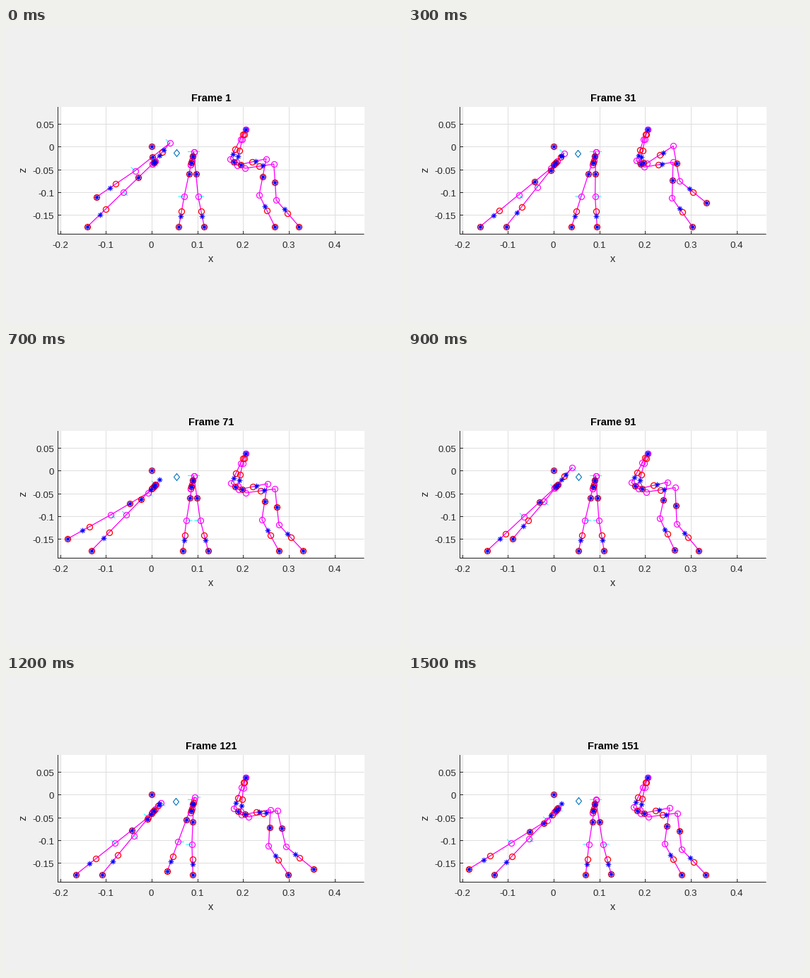
Recreate the animation shown at these times as a matplotlib script. Size 560 px wide and 420 px high, loop 1.6 s.

```python
import matplotlib.pyplot as plt
import numpy as np
from matplotlib.animation import FuncAnimation

W, H, DPI = 560, 420, 100
PX = 72 / DPI          # points per pixel
FRAMES, CYCLE = 16, 16
RATE = 8 / 8.3         # gait phase advanced per drawn frame
SWING = 3.5            # part of the cycle a foot spends in the air

plt.rcParams["font.family"] = "Liberation Sans"


class Leg:
    """A foot that slides on the ground and swings back, pulling its joints.

    Each joint is (rest position, shift per pixel of stride, shift per
    pixel of lift), listed from the body outwards.
    """

    def __init__(self, liftoff, stride, height, joints, stars, axis=None):
        self.liftoff, self.stride, self.height = liftoff, stride, height
        self.rest, self.slide, self.raised = np.swapaxes(joints, 0, 1)
        self.stars = np.array(stars)[:, None]
        self.axis = None if axis is None else np.array(axis)

    def foot(self, phase):
        back, front = self.stride
        t = (phase - self.liftoff) % CYCLE
        if t >= SWING:
            go = (CYCLE - t) / (CYCLE - SWING)
            return back + (front - back) * go, 0
        w = (t / SWING) ** 1.2
        go = w - 1.6 * np.sin(2 * np.pi * w) / (2 * np.pi)
        return back + (front - back) * go, self.height * np.sin(np.pi * w) ** 2

    def points(self, phase):
        x, lift = self.foot(phase)
        reach = x - np.mean(self.stride)
        joints = self.rest + self.slide * reach + self.raised * lift
        return np.vstack([joints, (x, 281.5 - lift)])


STILL = (0, 0)
LEGS = [
    Leg(5.8, (89, 146), 44, [
        ((206.5, 193), STILL, STILL),
        ((210.5, 188.5), STILL, STILL),
        ((210, 190), (0.5, -0.578), (0.4, -0.5)),
        ((167.5, 232), (0.72, -0.3), (0.18, -0.63)),
    ], (0.5, 0.6, 0.5, 0.655), (6, 5)),
    Leg(11, (231, 287), 38, [
        ((260.8, 193.5), STILL, STILL),
        ((262.5, 187.5), STILL, STILL),
        ((265.5, 175.5), STILL, (0.28, -0.75)),
        ((260, 239), (0.55, 0), (0.08, -0.8)),
    ], (0.5, 0.45, 0.5, 0.66), (8.5, 0)),
    Leg(0.5, (378, 431.5), 40, [
        ((339, 143.5), STILL, STILL),
        ((333.5, 158), (0.08, 0.02), STILL),
        ((323.7, 188.5), (0.275, 0.12), STILL),
        ((334.9, 197.8), (0.305, 0.13), (-0.07, -0.24)),
        ((375.7, 191), (0.315, 0.22), (-0.18, -0.82)),
        ((375.4, 242.1), (0.705, 0.22), (-0.1, -0.86)),
    ], (0, 0.75, 0.5, 0.62, 0.5, 0.355)),
]

fig = plt.figure(figsize=(W / DPI, H / DPI), dpi=DPI, facecolor="#f0f0f0")
ax = fig.add_axes([0, 0, 1, 1])
ax.set(xlim=(0, W), ylim=(H, 0))
ax.axis("off")

LEFT, RIGHT, TOP, BOTTOM = 73.5, 506.5, 112, 292.5
INK = "#262626"


def line(xs, ys, color, width=1.0, z=1):
    return ax.plot(xs, ys, color=color, lw=width * PX, zorder=z, snap=False,
                   solid_capstyle="butt")[0]


def marks(marker, color, size, z, width=1.1):
    return ax.plot([], [], ls="", marker=marker, ms=size * PX, mfc="none",
                   mec=color, mew=width * PX, zorder=z)[0]


def label(x, y, text, size=13.3, ha="center", **kw):
    return ax.text(x, y, text, fontsize=size * PX, ha=ha,
                   va=kw.pop("va", "center_baseline"),
                   color=kw.pop("color", INK), **kw)


ax.fill_between([LEFT, RIGHT], TOP, BOTTOM, color="white", lw=0, zorder=0)
for i in range(-2, 5):
    x = round(206 + 64.7 * i) + 0.5
    line([x, x], [TOP, BOTTOM], "#dedede")
    line([x, x], [BOTTOM, BOTTOM - 4.5], INK, z=2)
    label(x - 1, 307, f"{i / 10:g}")
for i in range(-3, 2):
    y = int(168.8 - 32.35 * i) + 0.5
    line([LEFT, RIGHT], [y, y], "#dedede")
    line([LEFT, LEFT + 4.5], [y, y], INK, z=2)
    label(68, y + 0.7, f"{i / 20:g}", ha="right")
line([LEFT, LEFT], [TOP, BOTTOM + 0.5], INK, z=2)
line([LEFT, RIGHT], [BOTTOM, BOTTOM], INK, z=2)
label(289.5, 327, "x", 14.67)
label(24.5, 201.5, "z", 14.67, rotation=90, va="center")
title = label(290, 99, "", 14.67, weight="bold", color="black")

pivots = line([], [], "cyan", 1, 3)
bones = line([], [], "magenta", 1.3, 4)
hinges = marks("o", "magenta", 8, 5, 1.2)
rings = marks("o", "red", 8, 6, 1.3)
stars = marks((8, 2, 0), "blue", 7.4, 7, 0.9)
kite = [(0, 1), (0.8, 0), (0, -1), (-0.8, 0), (0, 1)]
center = marks(kite, "#0072bd", 10, 5)

HEAD, GAP = (205.5, 168), (np.nan, np.nan)


def draw(k):
    s = k * RATE
    bone, hinge, ring, spoke = [], [], [HEAD], []
    star = [HEAD, (217, 180.5)]
    for leg in LEGS:
        for offset, side in ((0, 1), (CYCLE / 2, -1)):
            pts = leg.points(s + offset)
            start, step = pts[:-1], np.diff(pts, axis=0)
            bone += [*pts, GAP]
            hinge += [*start]
            ring += [*(start + step / 2), pts[-1]]
            star += [*(start + step * leg.stars), pts[-1]]
            if leg.axis is not None:
                for p in pts[-3:-1]:
                    spoke += [p, p + side * leg.axis, GAP]
    for artist, pts in ((bones, bone), (hinges, hinge), (rings, ring),
                        (stars, star), (pivots, spoke)):
        artist.set_data(*np.array(pts).T)
    turn = 2 * np.pi * s / 8
    center.set_data([240.5 + 0.4 * np.cos(turn)], [177.5 - 0.5 * np.cos(turn)])
    title.set_text(f"Frame {1 + 10 * k}")
    return bones, hinges, rings, stars, pivots, center, title


anim = FuncAnimation(fig, draw, frames=FRAMES, interval=100,
                     init_func=lambda: draw(0), repeat=True, repeat_delay=0)
plt.show()
```
